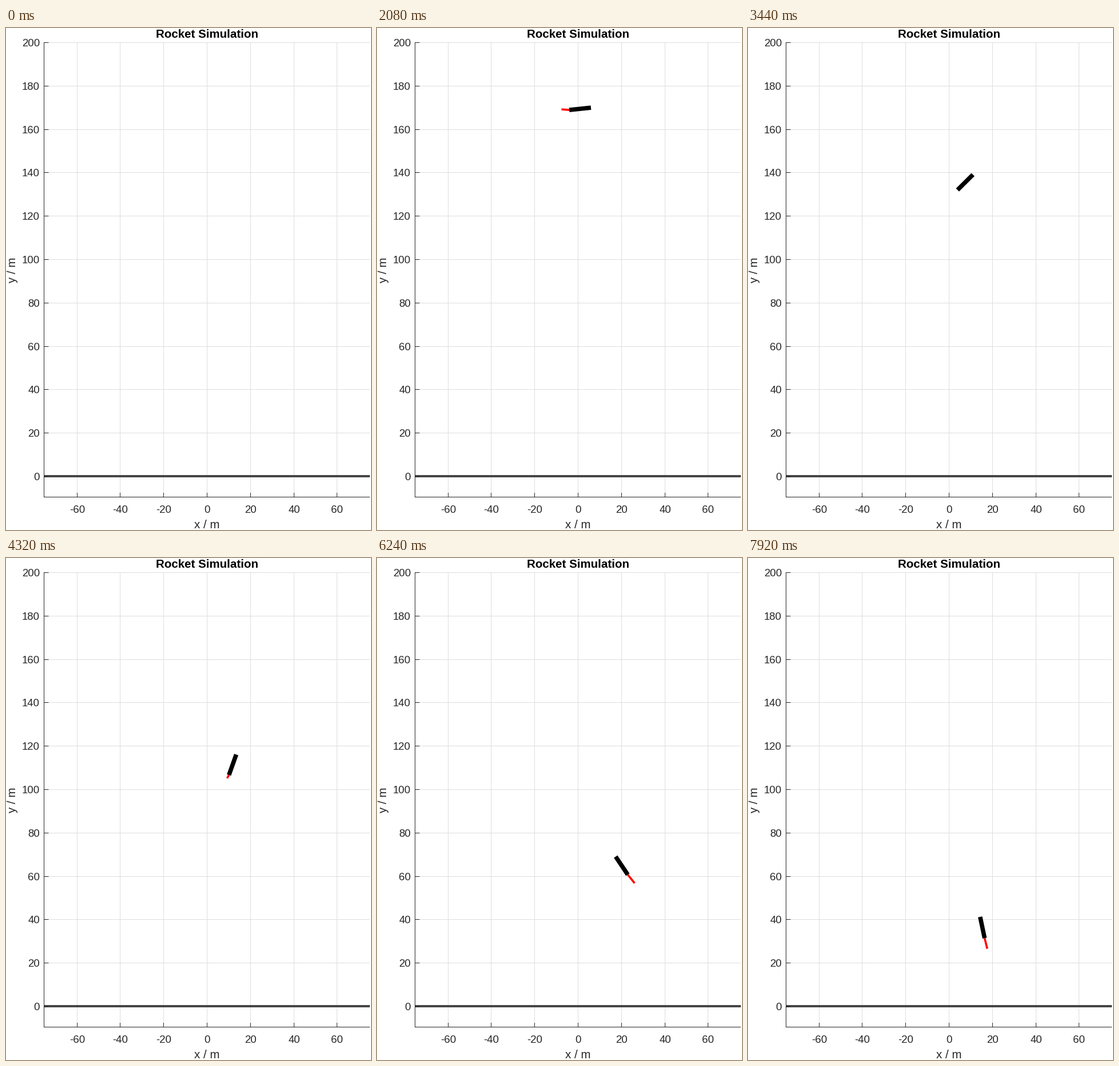
These frames come from a looping animation (638 px wide and 877 px high, 8000 ms). A matplotlib script:

```python
import numpy as np
import matplotlib.pyplot as plt
from matplotlib.animation import FuncAnimation

W, H, DPI = 638, 877, 64
STEPS, STEP_MS = 100, 80
START = 9                      # step at which the rocket appears
SCALE = 3.79                   # pixels per metre
X0, Y0 = 351.0, 783.0          # pixel column and row of the origin
LEFT, RIGHT, TOP, BOTTOM = 66.5, 636, 25.5, 819.5
HALF = 19.0                    # half the rocket's length
FLAME = 19.0                   # flame length at full thrust
INK, GRID = "#262626", "#dedede"

# Per step: gravity and full thrust in px, turning per degree of nozzle angle
GRAVITY, THRUST, TURN = 0.0565, 0.186, 0.0275

plt.rcParams["font.family"] = "Liberation Sans"


def px(n):
    return n * 72 / DPI


def heading(deg):
    a = np.radians(deg)
    return np.array([np.cos(a), -np.sin(a)])


def control(k):
    """Thrust as a fraction and nozzle angle in degrees."""
    if k < 20:
        return 0.0, 0.0
    if k < 45:                 # first burn tips the rocket upright
        return np.interp(k, [24, 30, 31], [1, 0.16, 0]), -10.5
    power = np.interp(k, [52, 54, 56], [0, 0.34, 1])
    angle = np.interp(k, [57, 65, 71, 77, 98], [-9.5, 9.5, 9.5, 5.2, 2])
    return power, angle


def fly():
    """Integrate the flight; one (centre, heading) pair per step."""
    pos, vel = np.array([351.2, 31.6]), np.array([0.0, 5.9])
    deg, spin = 0.0, 0.0
    poses = {}
    for k in range(START, STEPS):
        poses[k] = pos.copy(), deg
        power, angle = control(k)
        vel = vel + power * THRUST * heading(deg + angle) + [0, GRAVITY]
        spin -= power * TURN * angle
        pos = pos + vel
        deg += spin
    return poses


poses = fly()

fig = plt.figure(figsize=(W / DPI, H / DPI), dpi=DPI, facecolor="white")
ax = fig.add_axes([0, 0, 1, 1])
ax.set_xlim(0, W)
ax.set_ylim(H, 0)
ax.axis("off")


def line(xs, ys, color, width=1, z=1):
    return ax.plot(xs, ys, color=color, lw=px(width), zorder=z,
                   solid_capstyle="butt", snap=False)[0]


def label(x, y, text, size=20.5, color=INK, **kw):
    ax.text(x, y, text, fontsize=px(size), color=color, **kw)


for m in range(-60, 61, 20):
    x = round(X0 + m * SCALE) + 0.5
    line([x, x], [TOP, BOTTOM], GRID)
    line([x, x], [BOTTOM - 7.5, BOTTOM], INK, z=4)
    label(x, 847, str(m), 18.67, ha="center")

for m in range(0, 201, 20):
    y = round(Y0 - m * SCALE) + 0.5
    line([LEFT, RIGHT], [y, y], GRID)
    line([LEFT, LEFT + 8], [y, y], INK, z=4)
    label(59, y + 6.5, str(m), 18.67, ha="right")

line([LEFT, RIGHT], [Y0, Y0], "#464646", 4, z=3)
line([LEFT, LEFT], [TOP - 0.5, BOTTOM + 0.5], INK, z=4)
line([LEFT, RIGHT], [BOTTOM, BOTTOM], INK, z=4)

label(351.5, 17, "Rocket Simulation", color="black", ha="center",
      weight="bold")
label(351.5, 874, "x / m", ha="center")
label(21.5, 422.5, "y / m", rotation=90, ha="right", va="center")

flame = line([], [], "#ff0000", 3.6, z=5)
body = line([], [], "black", 7.6, z=6)


def draw(k):
    body.set_data([], [])
    flame.set_data([], [])
    if k in poses:
        centre, deg = poses[k]
        power, angle = control(k)
        axis = heading(deg) * HALF
        tail, nose = centre - axis, centre + axis
        body.set_data(*zip(tail, nose))
        if power > 0:
            tip = tail - heading(deg + angle) * FLAME * power
            flame.set_data(*zip(tail, tip))
    return body, flame


anim = FuncAnimation(fig, draw, frames=STEPS, interval=STEP_MS,
                     repeat=True, repeat_delay=0, blit=False)
plt.show()
```
